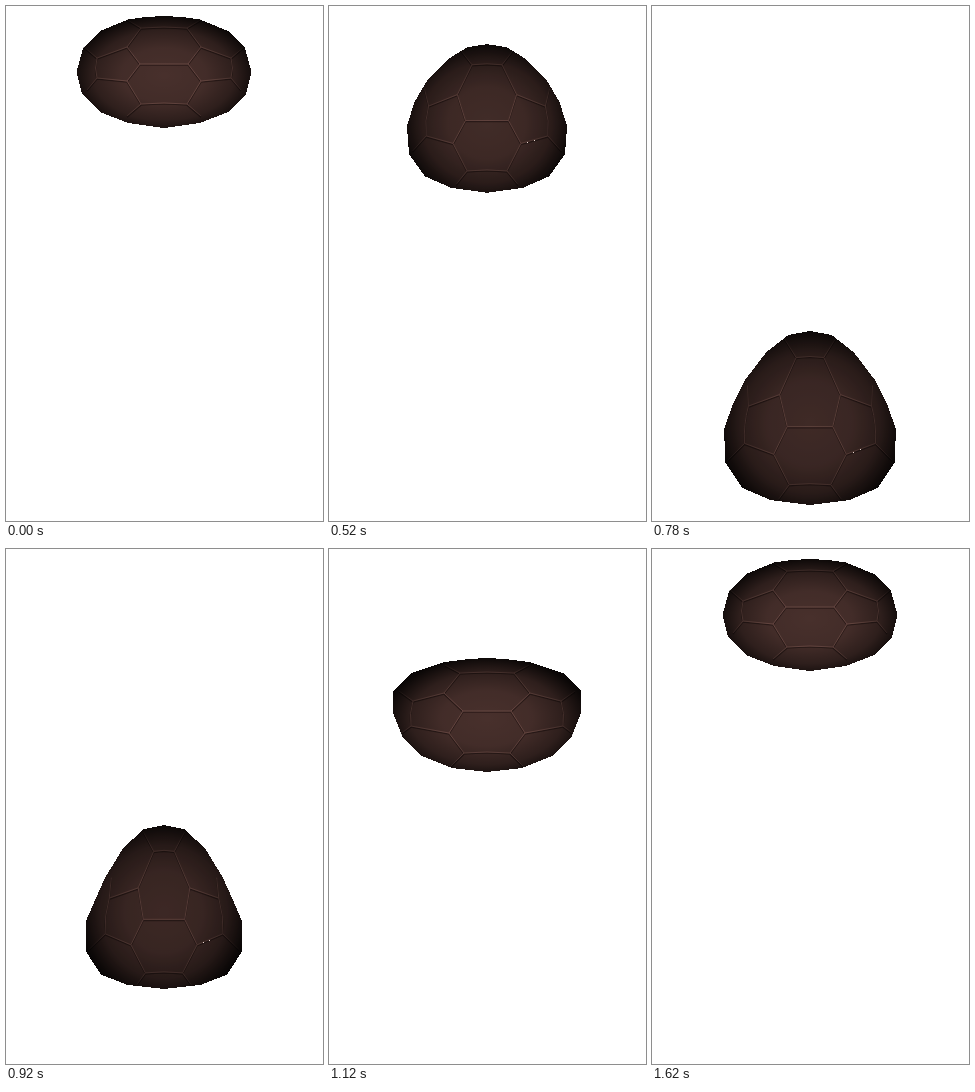
Animation of 317x515 px, one loop 1.66 s. Source, as an HTML page:

```html
<!DOCTYPE html>
<html>
<head>
<meta charset="utf-8">
<title>Bouncing ball</title>
<style>
html, body { margin: 0; width: 100%; height: 100%; overflow: hidden; background: #fff; }
svg { display: block; }
</style>
</head>
<body>
<svg width="317" height="515" viewBox="0 0 317 515">
  <defs>
    <radialGradient id="shade" cx=".5" cy=".53" r=".54">
      <stop offset="0" stop-color="#000" stop-opacity="0"/>
      <stop offset=".45" stop-color="#000" stop-opacity=".08"/>
      <stop offset=".75" stop-color="#000" stop-opacity=".36"/>
      <stop offset="1" stop-color="#000" stop-opacity=".85"/>
    </radialGradient>
    <clipPath id="clip"><path id="clipShape"/></clipPath>
  </defs>
  <path id="body" fill="#48302c" shape-rendering="crispEdges"/>
  <g clip-path="url(#clip)" fill="none" stroke-linejoin="round">
    <path id="groove" stroke="#1c0f0e" stroke-opacity=".6" stroke-width="1.3" transform="translate(0 1.2)"/>
    <path id="seam" stroke="#6b4a44" stroke-width="1"/>
  </g>
  <path id="rim" fill="url(#shade)" shape-rendering="crispEdges"/>
  <path id="dim" fill="#000" shape-rendering="crispEdges"/>
  <path id="glint" fill="#e6d5cf" shape-rendering="crispEdges"/>
</svg>
<script>
const LOOP = 1660, CX = 158;
const el = id => document.getElementById(id);

// Right half of each shape: ten rim points, then eleven seam joints (dx, y).
const makeShape = (top, bottom, half, pts) => {
  const out = [];
  for (let i = 0; i < pts.length; i += 2)
    out.push([pts[i] / half, (pts[i + 1] - top) / (bottom - top)]);
  return out;
};
const round = makeShape(10, 122, 87.5, [
  0, 10, 18, 11, 36, 13.5, 64, 25, 81, 42, 87.5, 66, 82, 88, 64, 106, 36, 117, 0, 122,
  24, 58, 37, 75, 23, 98, 37, 41, 23, 22, 67, 52, 67, 72, 81, 40, 77, 84, 37, 110, 38, 13]);
const egg = makeShape(122, 315, 75.5, [
  0, 122, 20, 127, 40, 150, 57, 184, 67, 211, 75.5, 235, 75.5, 271, 61, 298, 36, 310, 0, 315,
  20, 233, 32, 263, 18, 296, 25, 196, 10, 153, 53, 208, 57, 250, 51, 184, 73, 269, 27, 311, 20, 130]);
const dome = makeShape(109, 223, 94, [
  0, 109, 18, 110, 42, 113, 76, 124, 94, 142, 94, 164, 84, 189, 65, 207, 35, 219, 0, 223,
  24, 162, 38, 184, 23, 204, 43, 144, 27, 124, 74, 152, 76, 177, 88, 142, 88, 186, 36, 217, 42, 116]);

// time, top, bottom, half width, egg share, dome share
const keys = [
  [0, 10, 122, 87.5, 0, 0],
  [80, 11, 120.5, 87.5, 0, 0],
  [350, 11, 120.5, 87.5, 0, 0],
  [500, 32, 174, 81, .5, 0],
  [640, 122, 315, 75.5, 1, 0],
  [730, 237, 428, 76, 1, 0],
  [780, 325, 499, 86, .8, .1],
  [825, 424, 506, 122, .1, .5],
  [880, 345, 488, 88, .8, .1],
  [900, 345, 488, 88, .8, .1],
  [920, 276, 440, 78, 1, 0],
  [1020, 178, 312, 87, .5, .5],
  [1120, 109, 223, 94, 0, 1],
  [1300, 33, 150, 86, 0, .3],
  [1420, 14, 129, 87, 0, .1],
  [1620, 10, 122, 87.5, 0, 0]
];

const slope = (i, c) => (keys[i + 1][c] - keys[i][c]) / (keys[i + 1][0] - keys[i][0]);

// Monotone tangent, so that values never overshoot a key.
function tangent(i, c) {
  if (i === 0 || i === keys.length - 1) return 0;
  const a = slope(i - 1, c), b = slope(i, c);
  return a * b <= 0 ? 0 : 2 * a * b / (a + b);
}

function pose(t) {
  if (t >= 1620) return keys[keys.length - 1].slice(1);
  let i = 0;
  while (keys[i + 1][0] <= t) i++;
  const h = keys[i + 1][0] - keys[i][0], s = (t - keys[i][0]) / h;
  const s2 = s * s, s3 = s2 * s;
  return [1, 2, 3, 4, 5].map(c =>
    (2 * s3 - 3 * s2 + 1) * keys[i][c] + (s3 - 2 * s2 + s) * h * tangent(i, c) +
    (3 * s2 - 2 * s3) * keys[i + 1][c] + (s3 - s2) * h * tangent(i + 1, c));
}

const xy = p => p[0].toFixed(2) + ' ' + p[1].toFixed(2);
const mirror = p => [2 * CX - p[0], p[1]];
const line = pts => 'M' + pts.map(xy).join('L');

function seams(j) {
  const bulge = [(j[5][0] + j[6][0]) / 2 + 3, (j[5][1] + j[6][1]) / 2];
  return line([j[10], j[4], j[3], j[0], j[1], j[2], j[9]]) +
    line([j[3], j[5], j[7]]) + line([j[1], j[6], j[8]]) +
    'M' + xy(j[5]) + 'Q' + xy(bulge) + ' ' + xy(j[6]);
}

const bow = (p, dy) => 'M' + xy(p) + 'Q' + xy([CX, p[1] + dy]) + ' ' + xy(mirror(p));

// Mirrors every x of a path made of "x y" pairs.
const flip = d => d.replace(/(-?[\d.]+) (-?[\d.]+)/g, (m, x, y) => (2 * CX - x).toFixed(2) + ' ' + y);

function draw(time) {
  const t = Math.floor(time / 20) * 20;
  const [top, bottom, half, e, d] = pose(t);
  const pts = round.map((p, i) => {
    const mix = k => p[k] * (1 - e - d) + egg[i][k] * e + dome[i][k] * d;
    return [CX + mix(0) * half, top + mix(1) * (bottom - top)];
  });
  const rim = pts.slice(0, 10), j = pts.slice(10);
  const outline = line(rim.concat(rim.slice(1, 9).reverse().map(mirror))) + 'Z';
  for (const id of ['body', 'clipShape', 'rim', 'dim']) el(id).setAttribute('d', outline);
  el('dim').setAttribute('opacity', (.16 * e).toFixed(3));

  const right = seams(j);
  const all = right + flip(right) + bow(j[0], 0) + bow(j[2], -2) + bow(j[4], -2);
  el('seam').setAttribute('d', all);
  el('groove').setAttribute('d', all);

  const dot = f => 'M' + Math.round(j[1][0] + (j[6][0] - j[1][0]) * f) + ' ' +
    Math.round(j[1][1] + (j[6][1] - j[1][1]) * f) + 'h1v1h-1z';
  let dots = '';
  if (t >= 80 && t < 940) dots = t < 420 ? dot(.3) : dot(.22) + dot(.48);
  if (t >= 80 && t < 420) dots += 'M91 69h1v1h-1z';
  el('glint').setAttribute('d', dots);
}

const start = performance.now();
function tick() {
  draw((performance.now() - start) % LOOP);
  requestAnimationFrame(tick);
}
draw(0);
requestAnimationFrame(tick);
</script>
</body>
</html>
```
